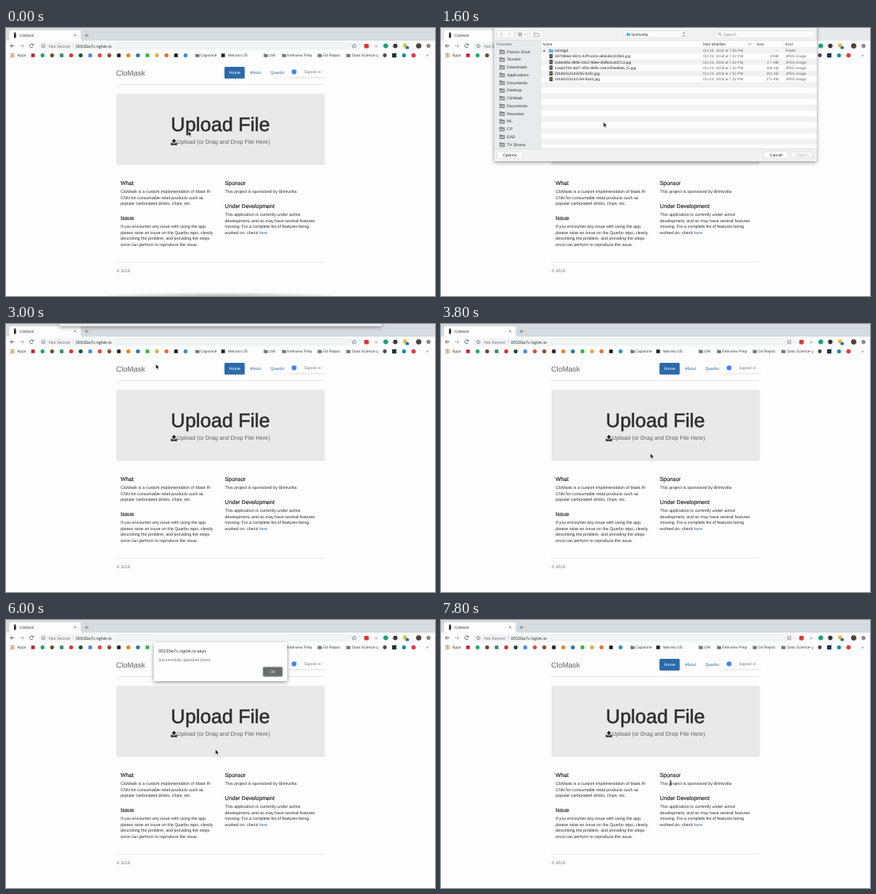
An HTML page for the animation above (8 s loop, 540x338 px).

```html
<!DOCTYPE html>
<html lang="en">
<head>
<meta charset="utf-8">
<title>CloMask</title>
<style>
  html, body { margin: 0; width: 100%; height: 100%; overflow: hidden; background: #fdfdfd; }
  svg { display: block; width: 100%; height: 100%; }
  text { font-family: "Liberation Sans", Arial, sans-serif; text-rendering: geometricPrecision; white-space: pre; }
</style>
</head>
<body>
<svg id="stage" viewBox="0 0 540 338"></svg>
<script>
const LOOP = 8000, STEP = 200;

// Drawing helpers, each returning SVG markup
const rect = (x, y, w, h, fill, r = 0, extra = '') =>
  `<rect x="${x}" y="${y}" width="${w}" height="${h}" rx="${r}" fill="${fill}" ${extra}/>`;
const dot = (x, y, r, fill) => `<circle cx="${x}" cy="${y}" r="${r}" fill="${fill}"/>`;
const line = (d, color = '#666', width = .7) =>
  `<path d="${d}" fill="none" stroke="${color}" stroke-width="${width}"/>`;
const text = (x, y, size, fill, str, extra = '') =>
  `<text x="${x}" y="${y}" font-size="${size}" fill="${fill}" ${extra}>${str}</text>`;
const centered = (x, y, size, fill, str) => text(x, y, size, fill, str, 'text-anchor="middle"');
const medium = (x, y, size, fill, str, weight) =>
  text(x, y, size, fill, str, `stroke="${fill}" stroke-width="${weight}"`);
const group = (id, content, extra = '') => `<g id="${id}" ${extra}>${content}</g>`;
const folder = (x, y, fill, s = 1) =>
  `<path transform="translate(${x} ${y}) scale(${s})" d="M-3-2.5h2.2l.8.8h3v4.2h-6z" fill="${fill}"/>`;
const paragraph = (x, y, lines) =>
  lines.map((str, i) => text(x, y + i * 7.5, 5.33, '#2c2c2c', str)).join('');

function browserBar() {
  const colors = ['#c8202c', '#20a65a', '#6a4c32', '#2f8f5b', '#e03028', '#174f35', '#4285f4', '#d94a3d', '#8a4a32',
    '#222', '#f08020', '#2474b5', '#2cb742', '#d8b04a', '#ee6a28', '#191919', '#2f8fd8'];
  const marks = colors.map((c, i) =>
    i % 3 ? dot(34 + 12 * i, 34.5, 2.5, c) : rect(31.7 + 12 * i, 32.2, 4.6, 4.6, c, .6)).join('');
  const folders = [[241, 'Capstone', 244.5], [327, 'UW', 331], [350, 'Interview Prep', 354],
    [395, 'Git Repos', 399], [431, 'Data Science-y', 435.5]];
  let apps = '';
  for (let i = 0; i < 9; i++)
    apps += rect(6 + i % 3 * 1.9, 32 + Math.floor(i / 3) * 1.9, 1.3, 1.3, ['#d8584c', '#4b8f5b', '#e2aa3a'][i % 3]);
  return rect(0, 0, 540, 16, '#d6dbe0', 0, 'id="strip"') + rect(0, 16, 540, 25.5, '#fdfdfd') +
    `<path d="M2 16q2 0 2-2V5q0-2 2-2h86q2 0 2 2v9q0 2 2 2z" fill="#fdfdfd"/>` +
    rect(10, 6.8, 2.6, 5.6, '#222', .8) + rect(10.7, 5.2, 1.2, 2.5, '#222') +
    text(17, 11.2, 4.7, '#333', 'CloMask') +
    line('M85.6 7.8l2.8 2.8m0-2.8l-2.8 2.8') + line('M99 9.3h4.6m-2.3-2.3v4.6') +
    line('M10.5 22.5h-5m2.3-2.3l-2.3 2.3 2.3 2.3', '#555', .8) +
    line('M17.5 22.5h5m-2.3-2.3l2.3 2.3-2.3 2.3', '#aaa', .8) +
    line('M34 21a2.3 2.3 0 1 0 .3 2.2M34.3 19.8v1.8h-1.8', '#555', .8) +
    rect(41, 17.8, 406, 9.6, '#f1f3f4', 4.8) +
    `<circle cx="47" cy="22.6" r="2.1" fill="none" stroke="#666" stroke-width=".6"/>` +
    line('M47 21.3v.5m0 .5v1.6', '#666', .6) +
    text(54, 24.6, 5.4, '#707478', 'Not Secure') + line('M84.5 20v5', '#c8c8c8', .5) +
    text(88, 24.6, 5.45, '#333', '00155a7c.ngrok.io') +
    `<path d="M438.3 19.9l.8 1.8 1.9.2-1.4 1.3.4 1.9-1.7-1-1.7 1 .4-1.9-1.4-1.3 1.9-.2z" fill="none" stroke="#555" stroke-width=".5"/>` +
    rect(451, 20, 5.6, 5.6, '#d8363a', 1) + dot(466, 23, 1.8, '#c9c9c9') + dot(478, 22.6, 3, '#1ba672') +
    dot(490, 22.6, 2.8, '#363636') + rect(500, 19.5, 4.5, 5, '#e7c12f') + rect(503, 23, 4, 3.5, '#2b6cc4', .5) +
    dot(519.5, 22.6, 3.3, '#53403a') + dot(531.8, 22.6, 2.6, '#8a8a8a') +
    apps + text(14, 36.3, 4.9, '#444', 'Apps') + marks +
    folders.map(([x, str, tx]) => folder(x, 34.5, '#777', .85) + text(tx, 36.3, 4.9, '#444', str)).join('') +
    rect(271, 32.2, 4.6, 4.6, '#222', .6) + text(279.5, 36.3, 4.9, '#444', 'Meravo US') +
    dot(476.8, 34.5, 2.4, '#55405f') + rect(486, 31.8, 5.4, 5.4, '#1c344c', .5) +
    dot(501, 34.5, 2.5, '#168b98') + dot(513, 34.5, 2.7, '#e13a48') + text(529, 36.3, 5.4, '#555', '»');
}

function page() {
  const link = '#2f6aa8';
  return medium(138.7, 59.8, 9.3, '#777', 'CloMask', .15) +
    rect(275, 49, 25.5, 14.8, '#2a69aa', 1.5) + centered(287.8, 58.4, 5.33, '#fff', 'Home') +
    text(307, 58.4, 5.33, link, 'About') + centered(341.6, 58.4, 5.33, link, 'Quarbo') +
    rect(356, 48, 45.2, 14.3, '#fefefe', .4, 'filter="url(#soft)"') + dot(362.6, 55.3, 3.1, '#4285f4') +
    text(375, 57.1, 4.9, '#757575', 'Signed in', 'letter-spacing=".12"') +
    rect(139, 71, 262, .7, '#dedede') + rect(139, 294.8, 262, .7, '#dedede') +
    rect(139, 83, 262.3, 89.8, '#e9e9e9', 2.3) +
    medium(207.6, 130.1, 24.65, '#2c2c2c', 'Upload File', .5) +
    `<path d="M211.4 139.8l3 3.2h-1.9v2.6h-2.2V143h-1.9zM207.5 144.7h2v1.6h3.8v-1.6h2v3h-7.8z" fill="#222"/>` +
    text(215.3, 146.2, 7.24, '#606060', 'Upload (or Drag and Drop File Here)') +
    [[144.3, 197.6, 'What'], [144.3, 241.6, 'Issue'], [275.6, 197.6, 'Sponsor'], [275.6, 226.5, 'Under Development']]
      .map(([x, y, str]) => medium(x, y, 7, '#2c2c2c', str, .2)).join('') +
    paragraph(144.3, 208.1, ['CloMask is a custom implementation of Mask R-',
      'CNN for consumable retail products such as', 'popular carbonated drinks, chips, etc.']) +
    paragraph(144.3, 252.1, ['If you encounter any issue with using the app,',
      'please raise an issue on the Quarbo repo, clearly', 'describing the problem, and providing the steps',
      'once can perform to reproduce the issue.']) +
    paragraph(275.6, 208.1, ['This project is sponsored by Brimvolta']) +
    paragraph(275.6, 237, ['This application is currently under active', 'development, and so may have several features',
      'missing. For a complete list of features being',
      `worked on, check <tspan fill="${link}">here</tspan>`]) +
    text(139, 308.3, 5.33, '#777', '© 2018.') +
    group('dock', rect(115, 333, 310, 5, 'url(#dockShade)'));
}

function fileSheet() {
  const places = ['Plumor Drive', 'Tavobin', 'Downloads', 'Applications', 'Documents', 'Desktop', 'CloMask',
    'Documents', 'Resumes', 'ML', 'CP', 'EAD', 'TV Shows'];
  const files = [['nonrigid', '--', 'Folder'], ['3d7098a0-4831-42ff-a3cb-a8a5563235b1.jpg', '3 MB'],
    ['0c8e48fa-3806-4313-9dee-d5964c4327c3.jpg', '2.7 MB'], ['1cabd709-3d27-4f5e-8991-1ee34f3e68e6_f1.jpg', '300 KB'],
    ['20180312143335-b19c.jpg', '301 KB'], ['20180315142159-8a20.jpg', '271 KB']];
  const rowHeight = 7.2, rowTop = i => 24.9 + rowHeight * i;
  const fileRow = ([name, size, kind = 'JPEG image'], i, nameColor, detailColor) => {
    const y = rowTop(i) + 5.3;
    const icon = i ? rect(136.5, y - 4.4, 4, 5.2, '#3b3b3b') + rect(137.5, y - 3, 2, 2, '#9b8f80')
      : `<path d="M129 27.2l2.6 1.5-2.6 1.5z" fill="#666"/>` + folder(138.5, 28.7, '#5ab4e4', .9);
    return icon + text(143, y, 4.75, nameColor, name) +
      text(329.5, y, 4.7, detailColor, `Oct ${i ? 24 : 25}, 2018 at 7:${i ? '22' : '55'} PM`) +
      text(425, y, 4.7, detailColor, size, 'text-anchor="end"') +
      text(433.5, y, 4.7, detailColor, kind);
  };
  let stripes = '';
  for (let i = 0; i < 17; i += 2) stripes += rect(125.5, rowTop(i), 347.5, rowHeight, '#f2f2f3');
  const button = (x, w, str, fill = '#fff', color = '#222') =>
    rect(x, 156, w, 8, fill, 1.4, 'stroke="#cbcbcb" stroke-width=".4"') + centered(x + w / 2, 161.8, 5.1, color, str);
  const control = (x, w) => rect(x, 3.6, w, 8.6, '#fcfcfc', 1.4, 'stroke="#d0d0d0" stroke-width=".4"');
  const head = (x, str) => text(x, 21.7, 4.6, '#333', str);

  return rect(67, -20, 406, 188, '#f0f1f0', 1, 'filter="url(#deep)"') + rect(67, -20, 406, 35.7, '#f2f2f2') +
    control(70.5, 21.5) + line('M77 6l-1.7 2 1.7 2', '#999') + line('M85 6l1.7 2-1.7 2', '#bbb') +
    control(94.5, 14) + line('M97 6.4h5m-5 1.6h5m-5 1.6h5') + line('M104.3 7.4l1 1.2 1-1.2') +
    control(112, 16) + line('M117 6h2l.7.8h3.5v3.6H117z', '#777', .6) +
    control(230, 80) + folder(236, 8, '#5ab4e4', .8) + text(240, 9.8, 5.1, '#333', 'brimvolta') +
    line('M304.5 7l1.2-1.5L307 7m-2.5 2l1.2 1.5L307 9', '#444') +
    control(346, 123) + `<circle cx="350.7" cy="7.5" r="1.5" fill="none" stroke="#777" stroke-width=".6"/>` +
    line('M351.8 8.6l1.4 1.5', '#777', .6) + text(355.5, 9.8, 5.1, '#888', 'Search') +
    rect(67, 15.7, 58.5, 136.5, '#e9eaeb') + rect(125.5, 15.7, 347.5, 136.5, '#fefefe') + stripes +
    rect(67, 15.5, 406, .5, '#cfcfcf') + rect(125.5, 24.5, 347.5, .4, '#dcdcdc') +
    rect(125.2, 15.7, .5, 136.5, '#d2d2d2') + rect(67, 152, 406, .5, '#cfcfcf') +
    text(70, 22, 4.7, '#666', 'Favorites') +
    places.map((str, i) => folder(77, 29.9 + 9.75 * i, '#77797b', 1.1) +
      rect(74.5, 29.4 + 9.75 * i, 5, 2.3, '#c2c4c5') + text(83, 31.7 + 9.75 * i, 5.1, '#333', str)).join('') +
    head(128, 'Name') + head(329.5, 'Date Modified') + head(397.5, 'Size') + head(433.5, 'Kind') +
    line('M387.5 19.5l1.5 1.5 1.5-1.5') + line('M327 17v6.5m68.5-6.5v6.5m36-6.5v6.5', '#d8d8d8', .4) +
    files.map((file, i) => fileRow(file, i, '#222', '#666')).join('') +
    group('selection', rect(125.5, rowTop(3), 347.5, rowHeight, '#1760cf') + fileRow(files[3], 3, '#fff', '#fff')) +
    button(71, 31, 'Options') + button(407, 29.5, 'Cancel') +
    button(440, 28.5, 'Open', '#f5f5f5', '#b5b5b5') + group('openReady', button(440, 28.5, 'Open', '#828282', '#fff'));
}

const alertBox = () =>
  rect(186, 28.5, 168, 48.5, '#fefefe', 1.5, 'filter="url(#deep)"') +
  text(192, 40.6, 5.7, '#333', '00155a7c.ngrok.io says') +
  text(192, 51.5, 5.15, '#737373', 'Successfully uploaded photo.') +
  rect(323.6, 59.3, 24.4, 11.9, '#6b6d6c', 1.2, 'stroke="#9a9d9c" stroke-width=".8"') +
  centered(335.8, 67, 4.9, '#e6e6e6', 'OK');

const shadow = (id, dy, blur, opacity) =>
  `<filter id="${id}" x="-20%" y="-30%" width="140%" height="160%"><feDropShadow dx="0" dy="${dy}" stdDeviation="${blur}" flood-opacity="${opacity}"/></filter>`;

document.getElementById('stage').innerHTML =
  `<defs>${shadow('soft', .5, .6, .35)}${shadow('deep', 1.5, 2.5, .42)}
   <radialGradient id="dockShade" cx=".5" cy="1" r="1" gradientTransform="translate(.25 0) scale(.5 1)">
   <stop offset="0" stop-color="#bbb"/><stop offset="1" stop-color="#bbb" stop-opacity="0"/></radialGradient></defs>` +
  rect(0, 0, 540, 338, '#fdfdfd') + page() + browserBar() +
  group('sheet', fileSheet()) + group('alert', alertBox()) +
  group('pointer',
    `<path id="arrow" d="M0 0V6.2L1.5 4.9l1 2.3 1.1-.5-1-2.2h2z" fill="#111" stroke="#fff" stroke-width=".5"/>` +
    group('beam', line('M-1.2-3Q0-3 0-2V2Q0 3-1.2 3M1.2-3Q0-3 0-2V2Q0 3 1.2 3', '#222', .7)));

const parts = Object.fromEntries([...document.querySelectorAll('g[id], #strip, #arrow')].map(el => [el.id, el]));
const show = (name, visible) => { parts[name].style.display = visible ? '' : 'none'; };
const move = (name, x, y) => parts[name].setAttribute('transform', `translate(${x} ${y})`);

// Keys are [time, ...values]
const sheetKeys = [[0, -190], [1000, -190], [1200, -71.7], [1400, 0], [2600, 0], [2800, -75], [3000, -165.5], [3200, -190]];
const pointerKeys = [[0, 229.5, 130], [200, 229.5, 130], [800, 210, 143], [1400, 210, 143], [2000, 188.5, 49.5],
  [2600, 188.5, 49.5], [3000, 188.5, 50.5], [3800, 263.6, 163.3], [6000, 263.6, 163.3], [6600, 335, 65],
  [6800, 335, 65], [7400, 289, 205.5]];

function sample(keys, t) {
  const next = keys.findIndex(key => key[0] > t);
  if (next < 0) return keys[keys.length - 1].slice(1);
  const from = keys[next - 1], to = keys[next];
  const p = (t - from[0]) / (to[0] - from[0]), eased = p * p * (3 - 2 * p);
  return from.slice(1).map((value, i) => value + (to[i + 1] - value) * eased);
}

function draw(now) {
  const t = Math.floor(now % LOOP / STEP) * STEP;
  const [sheetY] = sample(sheetKeys, t), [x, y] = sample(pointerKeys, t);
  const overText = t >= 7200 && y > 190;
  const fileChosen = t >= 2200;
  move('sheet', 0, sheetY);
  move('pointer', x, y);
  show('sheet', sheetY > -185);
  show('selection', fileChosen);
  show('openReady', fileChosen);
  show('alert', t >= 5400 && t < 6800);
  show('arrow', !overText);
  show('beam', overText);
  show('dock', t < 400);
  parts.strip.setAttribute('fill', t > 1200 && t < 3000 ? '#e6e8eb' : '#d6dbe0');
}

const start = performance.now();
(function tick() {
  draw(performance.now() - start);
  requestAnimationFrame(tick);
})();
</script>
</body>
</html>
```
